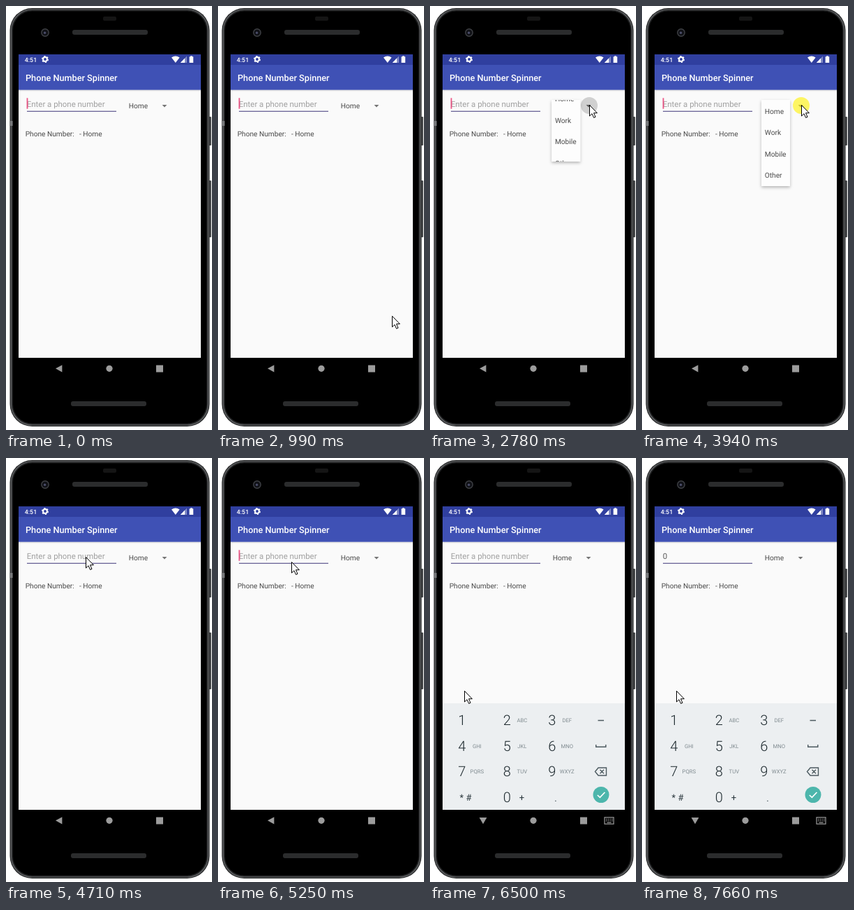
Recreate the animation shown at these times as an HTML page. Size 295 px wide and 605 px high, loop 8 s.

```html
<!DOCTYPE html>
<html lang="en">
<head>
<meta charset="utf-8">
<title>Phone number spinner</title>
<style>
  html, body { margin: 0; width: 100%; height: 100%; overflow: hidden; background: #fff; }
  svg { display: block; }
  text { font-family: Roboto, Arial, sans-serif; font-size: 10.16px; fill: #4a4a4a; white-space: pre; text-rendering: geometricPrecision; }
  .field { font-size: 11.43px; fill: #5c5c5c; }
  .hint { fill: #a0a0a0; }
  .digit { font-size: 20px; font-weight: 300; fill: #1f2b30; text-anchor: middle; }
  .letters { font-size: 7.7px; fill: #7f8a8f; text-anchor: middle; }
  .sign { font-size: 13px; fill: #2d3a40; text-anchor: middle; }
  .line { fill: none; stroke: #4c5a60; stroke-width: 1.4; }
</style>
</head>
<body>
<svg id="stage" width="295" height="605" viewBox="0 0 295 605">
  <defs>
    <linearGradient id="shade" x2="0" y2="1">
      <stop offset="0" stop-color="#000" stop-opacity=".16"/>
      <stop offset="1" stop-color="#000" stop-opacity="0"/>
    </linearGradient>
    <filter id="lift" x="-30%" y="-20%" width="160%" height="140%">
      <feDropShadow dx="0" dy="2" stdDeviation="2" flood-opacity=".28"/>
    </filter>
    <clipPath id="screen"><rect x="18" y="69" width="261" height="434"/></clipPath>
  </defs>

  <!-- phone body -->
  <rect x="289" y="158" width="5" height="41" rx="1" fill="#4a4c4e"/>
  <rect x="289" y="249" width="5" height="81" rx="1" fill="#4a4c4e"/>
  <rect x="5.5" y="3" width="286" height="597" rx="32" fill="#2a2b2c"/>
  <rect x="7.5" y="5" width="282" height="593" rx="30" fill="none" stroke="#636567" stroke-width="1.2"/>
  <rect x="9.5" y="7" width="278" height="589" rx="28" fill="#000" stroke="#1c1d1e"/>
  <rect x="5.5" y="164" width="4" height="7" fill="#77797b"/>
  <rect x="139" y="15" width="19" height="6" rx="2" fill="#151515"/>
  <g fill="#2b2c2d">
    <rect x="95" y="34" width="108" height="7" rx="3"/>
    <rect x="93" y="564" width="108" height="7" rx="3"/>
  </g>
  <circle cx="56" cy="38" r="5.2" fill="#101116" stroke="#404246" stroke-width="1.4"/>
  <circle cx="55.6" cy="38.2" r="1.7" fill="#4a4c68"/>

  <!-- app -->
  <rect x="18" y="119" width="261" height="383" fill="#fafafa"/>
  <rect x="18" y="119.7" width="261" height="2.3" fill="url(#shade)"/>
  <rect x="18" y="84" width="261" height="35.7" fill="#3f51b5"/>
  <rect x="18" y="69" width="261" height="15" fill="#303f9f"/>
  <text x="26.7" y="79.8" style="font-size:8.9px;font-weight:500;fill:#fff">4:51</text>
  <g fill="none" stroke="#fff">
    <circle cx="56" cy="76" r="2.9" stroke-width="2"/>
    <circle cx="56" cy="76" r="4.3" stroke-width="1.4" stroke-dasharray="2.2 2.3"/>
  </g>
  <g fill="#fff">
    <path d="M237 73.6Q242.8 69.6 248.6 73.6L242.8 81Z"/>
    <path d="M259 71.5V81H249.8Z" opacity=".4"/>
    <path d="M256 74.6V81H249.8Z"/>
    <path d="M262.6 72.2H264.2V71.2H266.6V72.2H268.2V81H262.6Z"/>
  </g>
  <text x="28" y="106.6" style="font-size:12.7px;font-weight:500;fill:#fff">Phone Number Spinner</text>

  <text id="hint" class="field hint" x="29.8" y="144">Enter a phone number</text>
  <text id="typed" class="field" x="29.8" y="144">0</text>
  <rect x="30" y="149.7" width="128" height="1.2" fill="#5f5890"/>
  <rect id="caret" y="131.3" width="1.8" height="15.4" fill="#ec5585"/>
  <text x="175.8" y="146.4">Home</text>
  <path d="M223.6 141H230.4L227 144.4Z" fill="#737373"/>
  <text x="27.7" y="186">Phone Number:</text>
  <text x="104.9" y="186">- Home</text>

  <circle id="ripple" cx="228" cy="142" r="12" fill="#000" opacity=".17"/>
  <g id="popup">
    <rect id="card" fill="#fdfdfd" filter="url(#lift)"/>
    <svg id="list" overflow="hidden"><g id="items"></g></svg>
  </g>

  <g clip-path="url(#screen)"><g id="keys">
    <rect x="18" y="350" width="261" height="152" fill="#eceff1"/>
    <text class="sign" x="51" y="489">* #</text>
    <text class="sign" x="131.5" y="489">+</text>
    <text class="sign" x="180" y="490">.</text>
    <path class="line" d="M240.5 374.5H249M237.7 409V412.3H251.8V409"/>
    <path class="line" d="M236.5 447.5L241 442H252.5V453H241ZM243.5 444.8L249 450.2M249 444.8L243.5 450.2"/>
    <circle cx="245" cy="480.5" r="11.5" fill="#4db6ac"/>
    <path d="M239.8 481L243.4 484.4L250.4 477" fill="none" stroke="#fff" stroke-width="1.7"/>
  </g></g>

  <!-- navigation bar -->
  <g fill="#9c9c9c">
    <path id="back" d="M71 517.3L80.4 512.2V522.4Z"/>
    <path id="down" d="M70.6 513H81.4L76 522.2Z"/>
    <circle cx="148" cy="517.3" r="4.6"/>
    <rect x="215" y="512.5" width="10" height="10"/>
    <g id="ime" fill="none" stroke="#9c9c9c">
      <rect x="250" y="512.8" width="13" height="9.4" stroke-width="1.2"/>
      <path d="M252 515.4H261.5M252 517.6H261.5" stroke-width="1.3" stroke-dasharray="1.3 1.4"/>
      <path d="M253.5 520.2H259.5" stroke-width="1.2"/>
    </g>
  </g>

  <circle id="press" r="12" fill="#fff200" opacity=".6"/>
  <path id="cursor" d="M.5 .5V16L4 12.7L6.6 18.4L9 17.3L6.5 11.7H11.4Z" fill="#fff" stroke="#000" stroke-width="1"/>
</svg>
<script>
const LOOP = 8000, STEP = 76.7;
const el = id => document.getElementById(id);
const show = (id, on) => { el(id).style.display = on ? '' : 'none'; };
const within = (t, a, b) => t >= a && t < b;

function set(id, attrs) {
  for (const name in attrs) el(id).setAttribute(name, attrs[name]);
}

function addText(parent, cls, x, y, value) {
  const node = document.createElementNS('http://www.w3.org/2000/svg', 'text');
  if (cls) node.setAttribute('class', cls);
  node.setAttribute('x', x);
  node.setAttribute('y', y);
  node.textContent = value;
  parent.append(node);
}

['Home', 'Work', 'Mobile', 'Other'].forEach((name, i) =>
  addText(el('items'), '', 4.8, 19.6 + i * 30.5, name));

['', 'ABC', 'DEF', 'GHI', 'JKL', 'MNO', 'PQRS', 'TUV', 'WXYZ'].forEach((letters, i) => {
  const x = 45.7 + (i % 3) * 64.5, y = 381 + Math.floor(i / 3) * 36.7;
  addText(el('keys'), 'digit', x, y, i + 1);
  addText(el('keys'), 'letters', x + 21.6, y - 4, letters);
});
addText(el('keys'), 'digit', 110.2, 491, 0);

// Pointer runs: start time, number of steps, points passed
const runs = [
  [680, 1, [[263, 583]]],
  [840, 11, [[262, 565], [240, 360], [222, 215], [217, 146]]],
  [1680, 6, [[218, 135], [222, 128], [225, 131], [227, 137], [228, 140], [228, 140]]],
  [2230, 1, [[228, 141]]],
  [4400, 7, [[222, 144], [206, 146], [180, 146], [145, 144], [114, 141], [109, 141], [108, 141]]],
  [5180, 7, [[105, 148], [93, 195], [78, 242], [66, 275], [57, 305], [51, 325], [49, 332]]]
];
const blinks = [70, 530, 1070, 1530, 2070, 2550, 4400, 5030, 5560, 6040, 6500, 7030, 7660];
const presses = [[2380, 2550], [3940, 4090], [5030, 5180]];
const opening = [0, .25, .5, .715, .9, 1];
const sliding = [152, 60, 12, 1, 0];

const stepAt = (t, start) => Math.floor((t - start + 4) / STEP);
const stepOf = (list, t, start) => list[Math.min(stepAt(t, start), list.length - 1)];

function pointer(t) {
  const run = runs.filter(r => t >= r[0]).pop();
  if (!run) return null;
  const [start, count, pts] = run;
  const k = Math.min(stepAt(t, start), count - 1);
  const u = count > 1 ? k / (count - 1) * (pts.length - 1) : 0;
  const i = Math.floor(u), a = pts[i], b = pts[i + 1] || a;
  return a.map((v, n) => Math.round(v + (b[n] - v) * (u - i)));
}

function drawPopup(t) {
  const p = within(t, 2550, 4250) ? stepOf(opening, t, 2550) : 0;
  show('popup', p > 0);
  if (!p) return;
  const box = { x: 171 + (1 - p) * 11, y: 134, width: 41, height: 123 * p };
  set('card', box);
  set('list', box);
  set('items', { transform: `translate(0 ${-(1 - p) * 60})` });
  set('popup', { opacity: t < 4090 ? 1 : t < 4170 ? .65 : .3 });
}

function drawKeys(t) {
  const open = t >= 5260;
  show('keys', open);
  show('back', !open);
  show('down', open);
  show('ime', open);
  if (!open) return;
  const y = stepOf(sliding, t, 5180);
  set('keys', { transform: `translate(0 ${y})`, opacity: y > 30 ? .6 : y > 0 ? .93 : 1 });
}

function draw(t) {
  const typed = t >= 7200;
  show('hint', !typed);
  show('typed', typed);
  show('caret', blinks.filter(b => t >= b).length % 2 === 0);
  set('caret', { x: typed ? 35.6 : 29.6 });
  show('ripple', within(t, 2550, 2930));
  drawPopup(t);
  drawKeys(t);

  const at = pointer(t);
  show('cursor', at);
  show('press', presses.some(([a, b]) => within(t, a, b)));
  if (at) {
    set('cursor', { transform: `translate(${at})` });
    set('press', { cx: at[0], cy: at[1] + 1 });
  }
}

const begin = performance.now();
function tick() {
  draw((performance.now() - begin) % LOOP);
  requestAnimationFrame(tick);
}
tick();
</script>
</body>
</html>
```
